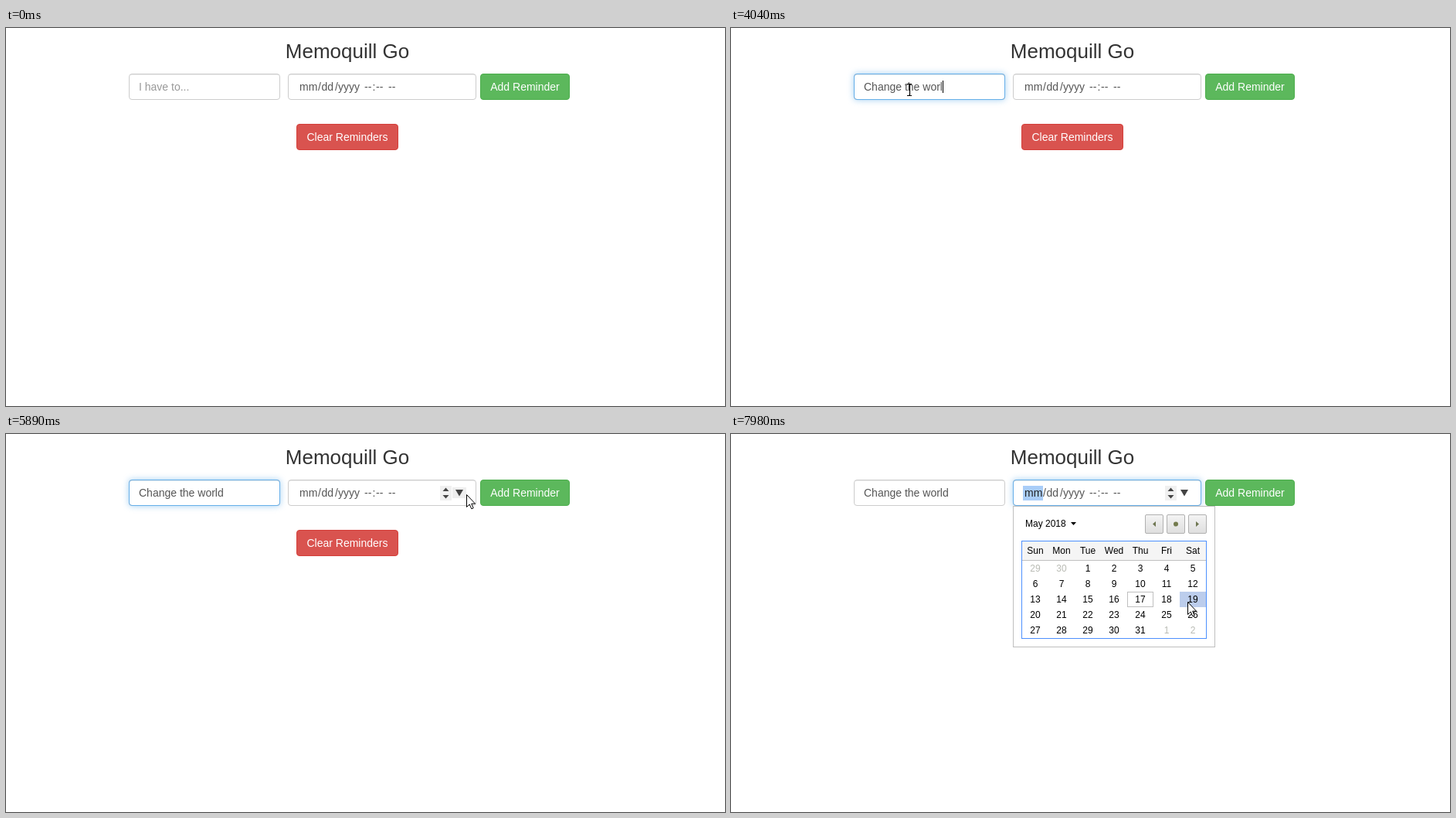
An HTML page that plays this animation: 931 px wide and 489 px high, repeating every 8000 ms.

```html
<!DOCTYPE html>
<html lang="en">
<head>
<meta charset="utf-8">
<title>Reminders</title>
<style>
  html, body { margin: 0; width: 100%; height: 100%; overflow: hidden; background: #fff; }
  svg { display: block; width: 100vw; height: 100vh; }
  text { font: 14px "Liberation Sans", Arial, sans-serif; white-space: pre; }
  .small text { font-size: 12px; }
  .glow { filter: blur(4px); }
</style>
</head>
<body>
<svg id="stage" viewBox="0 0 931 489"></svg>
<script>
const LOOP = 8000;
const stage = document.getElementById('stage');

function add(parent, tag, attrs = {}, content) {
  const el = document.createElementNS('http://www.w3.org/2000/svg', tag);
  for (const k in attrs) el.setAttribute(k, attrs[k]);
  if (content !== undefined) el.textContent = content;
  return parent.appendChild(el);
}
const rect = (p, x, y, width, height, fill, more) => add(p, 'rect', { x, y, width, height, fill, ...more });
const box = (p, x, y, w, h, fill, stroke, rx = 0) => rect(p, x + .5, y + .5, w - 1, h - 1, fill, { stroke, rx });
const label = (p, x, y, fill, str, more) => add(p, 'text', { x, y, fill, ...more }, str);
const shape = (p, d, fill, more) => add(p, 'path', { d, fill, ...more });
const show = (el, on) => el.setAttribute('display', on ? 'inline' : 'none');
const inside = (p, x, y, w, h) => p && p[0] >= x && p[0] < x + w && p[1] >= y && p[1] < y + h;
const middle = { 'text-anchor': 'middle' };

// Widgets
function field(x, w) {
  const glow = rect(stage, x, 59, w, 34, '#66afe9', { rx: 4, class: 'glow' });
  box(stage, x, 59, w, 34, '#fff', '#ccc', 3.5);
  rect(stage, x + 2, 60, w - 4, 1, '#000', { opacity: .075 });
  const ring = box(stage, x, 59, w, 34, 'none', '#66afe9', 3.5);
  return amount => {
    glow.setAttribute('opacity', .6 * amount);
    ring.setAttribute('opacity', amount);
  };
}

function button(x, y, w, str, fill, stroke) {
  const face = box(stage, x, y, w, 34, fill, stroke, 3.5);
  label(stage, x + w / 2, y + 22, '#fff', str, middle);
  return face;
}

label(stage, 442, 39, '#333', 'Memoquill Go', { ...middle, style: 'font-size:26px' });
const focusTask = field(159, 196);
const focusDate = field(365, 244);
const addFace = button(614, 59, 116, 'Add Reminder', '#5cb85c', '#4cae4c');
button(376, 124, 132, 'Clear Reminders', '#d9534f', '#d43f3a');

const task = label(stage, 172, 81, '#555', '');
const caret = rect(stage, 172, 68, 1, 16, '#000');

const picked = rect(stage, 378, 67, 26, 19, '#a9cdf8');
const dateParts = [[380, 'mm'], [404, '/'], [408.5, 'dd'], [426, '/'], [430, 'yyyy'],
  [464, '--'], [474.5, ':'], [479, '--'], [495, '--']];
const month = dateParts.map(([x, s]) => label(stage, x, 81, '#555', s))[0];

const tools = add(stage, 'g');
rect(tools, 562, 67, 15, 19, '#f0f0f0');
shape(tools, 'M565.5 74h8l-4-4.5zM565.5 79h8l-4 4.5z', '#444');
const dropHover = rect(tools, 578, 69, 18, 14, '#eee');
shape(tools, 'M582 72h10l-5 8.5z', '#444');

// Calendar popup
const calendar = add(stage, 'g', { class: 'small' });
const shade = add(add(calendar, 'defs'), 'linearGradient', { id: 'shade', x2: 0, y2: 1 });
add(shade, 'stop', { offset: 0, 'stop-color': '#f4f4f4' });
add(shade, 'stop', { offset: 1, 'stop-color': '#dedede' });

box(calendar, 365, 93, 262, 183, '#fff', '#bfbfbf');
label(calendar, 381, 120, '#000', 'May 2018');
shape(calendar, 'M440 114h7l-3.5 4z', '#000');
for (const x of [536, 564, 592]) box(calendar, x, 104, 24, 25, 'url(#shade)', '#b0b0b0', 1.5);
shape(calendar, 'M550 113v7l-4-3.5zM602 113v7l4-3.5z', '#6f7752');
add(calendar, 'circle', { cx: 576, cy: 116.5, r: 3, fill: '#737b4e' });

rect(calendar, 377, 139, 238, 24, '#f5f5f5');
rect(calendar, 377, 163, 238, 1, '#c0c0c0');
const cell = rect(calendar, 377, 164, 34, 20, '#e5ecf8');
box(calendar, 513, 204, 34, 20, 'none', '#bfbfbf');
box(calendar, 376, 138, 240, 127, 'none', '#4d90fe');
const colX = i => 394 + 34 * i;
'Sun Mon Tue Wed Thu Fri Sat'.split(' ').forEach((d, i) => label(calendar, colX(i), 155, '#000', d, middle));
for (let i = 0; i < 35; i++) {
  const day = i < 2 ? 29 + i : (i - 2) % 31 + 1;
  const current = i >= 2 && i < 33;
  label(calendar, colX(i % 7), 178 + 20 * Math.floor(i / 7), current ? '#000' : '#b9bbb4', day, middle);
}

// Pointers
const line = { stroke: '#000', 'stroke-width': 1, 'stroke-linejoin': 'round' };
const arrow = shape(stage, 'M.5 .5V16.5L4.2 13 6.8 18.8 9.2 17.8 6.7 12.2H11.6Z', '#fff', line);
const beam = shape(stage, 'M-3-7.5h2.5l.5.5.5-.5h2.500M-3 7.500h2.500l.5-.5.5.5h2.500M.5-7v14', 'none',
  { ...line, 'stroke-width': 1.2 });
const hand = shape(stage,
  'M-1.500 10V1.500Q0-.5 1.500 1.500V7Q4 5.500 5 7.500 7 6.500 8 8.500 11 8 11 10V14L9 19H1L-4.500 11.500Q-4-.5 8-1.500 10Z'
    .replace('Q-4-.5 8-1.500 10Z', 'Q-4 8-1.500 10Z'), '#fff', line);

// Each move: start, end, positions shown, points on the way
const moves = [
  [150, 840, 10, [[654, 386], [560, 310], [468, 244], [390, 192], [328, 148], [282, 114], [254, 95], [238, 84], [232, 80], [231, 80]]],
  [4900, 5660, 11, [[240, 80], [340, 88], [470, 104], [564, 110], [618, 98], [640, 88], [640, 82], [630, 79], [616, 79], [602, 79], [596, 79]]],
  [5740, 5970, 4, [[596, 79], [596, 78], [596, 76], [595, 75]]],
  [6120, 6500, 5, [[594, 75], [593, 73]]],
  [6750, 7520, 11, [[592, 77], [586, 108], [576, 148], [573, 178], [580, 202], [588, 215], [591, 217]]]
];

function pointer(t) {
  const m = moves.filter(v => t >= v[0]).pop();
  if (!m) return null;
  const [from, to, n, pts] = m;
  const k = Math.min(n - 1, Math.floor((t - from + 2) / (to - from) * (n - 1)));
  const s = k / (n - 1) * (pts.length - 1);
  const i = Math.min(pts.length - 2, Math.floor(s + 1e-6));
  return [0, 1].map(a => Math.round(pts[i][a] + (pts[i + 1][a] - pts[i][a]) * (s - i)));
}

const phrase = 'Change the world';
const keys = [1240, 1560, 1630, 1790, 1860, 2030, 2260, 2870, 3040, 3110, 3340, 3420, 3650, 3820, 4040, 4120];
const TASK_FOCUS = 690, DATE_FOCUS = 6200, POPUP = 6350, PRESS = 7980, BLINK = 530;

const pen = document.createElement('canvas').getContext('2d');
pen.font = '14px "Liberation Sans", Arial, sans-serif';

function ease(t, start) {
  const p = Math.max(0, Math.min(1, (t - start) / 150));
  return p * p * (3 - 2 * p);
}

function draw(t) {
  const p = pointer(t);
  const typed = keys.filter(k => k <= t).length;
  const dated = t >= DATE_FOCUS;

  focusTask(ease(t, TASK_FOCUS) - ease(t, DATE_FOCUS));
  focusDate(ease(t, DATE_FOCUS));

  const words = phrase.slice(0, typed);
  task.textContent = words || 'I have to...';
  task.setAttribute('fill', words ? '#555' : '#999');
  const last = typed ? keys[typed - 1] : 760;
  caret.setAttribute('x', Math.round(172 + pen.measureText(words).width));
  show(caret, t >= last && !dated && Math.floor((t - last) / BLINK) % 2 === 0);

  show(picked, dated);
  month.setAttribute('fill', dated ? '#222' : '#555');
  show(tools, dated || inside(p, 365, 59, 244, 34));
  show(dropHover, inside(p, 578, 60, 19, 32));

  const onAdd = inside(p, 614, 59, 116, 34);
  addFace.setAttribute('fill', onAdd ? '#449d44' : '#5cb85c');
  addFace.setAttribute('stroke', onAdd ? '#398439' : '#4cae4c');

  show(calendar, t >= POPUP);
  const onDay = inside(p, 377, 164, 238, 100);
  show(cell, onDay);
  if (onDay) {
    cell.setAttribute('x', 377 + 34 * Math.floor((p[0] - 377) / 34));
    cell.setAttribute('y', 164 + 20 * Math.floor((p[1] - 164) / 20));
    cell.setAttribute('fill', t >= PRESS ? '#bccdec' : '#e5ecf8');
  }

  const onTask = inside(p, 159, 59, 196, 34);
  show(beam, p && onTask);
  show(hand, p && onAdd);
  show(arrow, p && !onTask && !onAdd);
  if (p) for (const c of [arrow, beam, hand]) c.setAttribute('transform', `translate(${p})`);
}

function tick() {
  draw(performance.now() % LOOP);
  requestAnimationFrame(tick);
}
draw(0);
requestAnimationFrame(tick);
</script>
</body>
</html>
```
